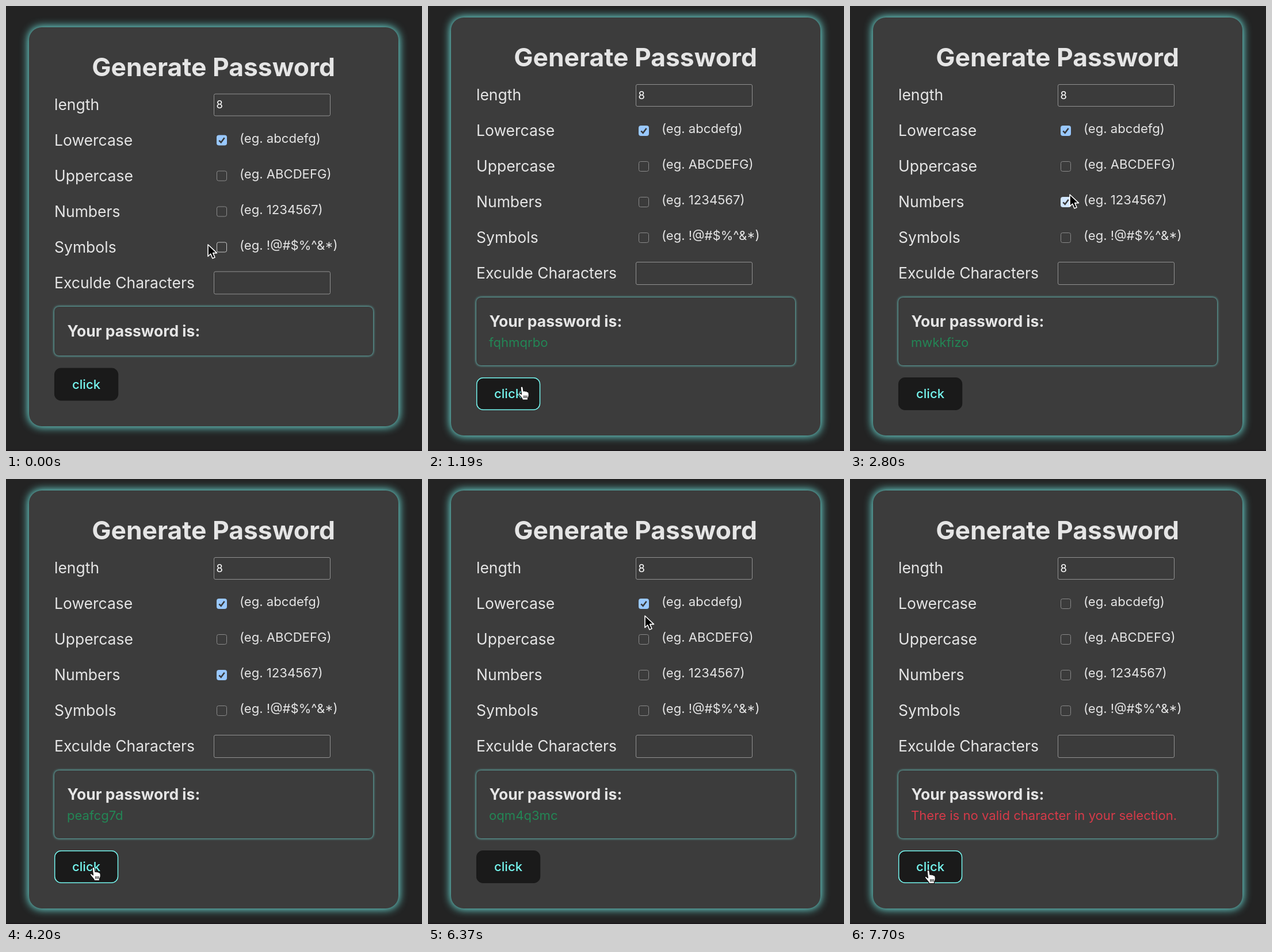
These frames come from a looping animation (723 px wide and 774 px high, 8 s). An HTML page:

```html
<!DOCTYPE html>
<html lang="en">
<head>
<meta charset="utf-8">
<title>Generate Password</title>
<style>
  html, body { margin: 0; width: 100%; height: 100%; overflow: hidden; background: #232323; }
  #stage { position: relative; width: 723px; height: 774px; overflow: hidden; }
  #stage::after { content: ""; position: absolute; left: 0; top: 772px; width: 723px; height: 2px; background: #1b181b; }
  #card, #box, svg { position: absolute; }
  #card { left: 40px; width: 642px; border-radius: 22px; background: #3c3c3c; box-shadow: 0 0 15px 1px #76f5ee; }
  #box { left: 84px; width: 554px; border-radius: 8px; background: #3c3c3c; box-shadow: 0 0 4px #76f5ee; }
  svg { left: 0; top: 0; z-index: 1; }
  text { font: 22.1px Inter, sans-serif; font-optical-sizing: none; fill: #e5e5e5; white-space: pre; }
  .title { font-size: 44.4px; font-weight: 700; text-anchor: middle; }
  .label { font-size: 26.5px; }
  .head { font-size: 26.5px; font-weight: 700; }
  .value { font-size: 18.4px; fill: #fff; }
  .click { font-weight: 500; fill: #76f7f0; text-anchor: middle; }
  .field { fill: #3b3b3b; stroke: #929292; }
  .tick { fill: none; stroke: #383838; stroke-width: 2.6; }
</style>
</head>
<body>
<div id="stage">
  <div id="card"></div>
  <div id="box"></div>
  <svg width="723" height="774">
    <g id="form">
      <text class="title" x="360.6" y="105">Generate Password</text>
      <rect class="field" x="361.5" y="136.5" width="202" height="38" rx="2.5"/>
      <text class="value" x="365.5" y="161.8">8</text>
      <rect class="field" x="361.5" y="445.5" width="202" height="39" rx="2.5"/>
      <text class="head" x="106.5" y="558">Your password is:</text>
    </g>
    <text id="result" x="106" y="593"></text>
    <g id="button">
      <rect id="face" x="84.7" y="646.7" width="109.8" height="55.6" rx="11" fill="#1a1a1a" stroke-width="1.5"/>
      <text class="click" x="139.5" y="682">click</text>
    </g>
    <g id="cursor" stroke-linejoin="round">
      <path id="arrow" d="M0 0V20.5L4.7 16 8 24 12 22.3 8.7 14.6H15.5Z" fill="#000" stroke="#fff" stroke-width="1.6"/>
      <g id="hand" stroke="#111" stroke-width="1.2">
        <path fill="#fff" d="M-2 1.5Q-1.5-.5 .5 0 2 .4 2 2L3 8Q5 6.5 6.3 8.3 8.2 7.3 9.2 9.2 11.5 8.8 12 11L12.3 15Q12 18 10.5 20V23H1.5Q1 20.5-2 17.5-5.5 13.5-6 12-5.5 10-3 11.5L-.5 13.5Z"/>
        <path d="M3.8 15.5v4.5M6.3 15.5v4.5M8.8 15.5v4.5"/>
      </g>
    </g>
  </svg>
</div>
<script>
const LOOP = 8000, STEP = 70, SHIFT = 16.5;
const $ = id => document.getElementById(id);
const form = $('form');

function add(tag, attrs, text = '') {
  const el = document.createElementNS('http://www.w3.org/2000/svg', tag);
  for (const k in attrs) el.setAttribute(k, attrs[k]);
  el.textContent = text;
  return form.appendChild(el);
}

const labels = ['length', 'Lowercase', 'Uppercase', 'Numbers', 'Symbols', 'Exculde Characters'];
labels.forEach((s, i) => add('text', { class: 'label', x: 84, y: 164.3 + 62 * i }, s));

const examples = ['abcdefg', 'ABCDEFG', '1234567', '!@#$%^&*'];
const options = examples.map((s, i) => {
  const cy = 217 + 62 * i;
  add('text', { x: 406, y: cy + 4 }, `(eg. ${s})`);
  return {
    cy,
    box: add('rect', { x: 366.5, y: cy - 8.5, width: 17, height: 17, rx: 3 }),
    tick: add('path', { class: 'tick', d: `M370.3 ${cy + .3}l3.4 3.5 6-8` })
  };
});

// Cursor stops: time, x, y
const path = [
  [0, 351, 415], [770, 170, 655], [1050, 163, 662], [1680, 163, 662],
  [2520, 379, 335], [2660, 379, 335], [2800, 382, 328], [2870, 382, 328],
  [3780, 152, 675.5], [4480, 152, 675.5], [5390, 385, 358], [5600, 379, 344],
  [5810, 379, 344], [6370, 377, 238], [6510, 376, 220], [6720, 376, 220],
  [7490, 136, 680.5], [8000, 136, 680.5]
];

const results = [
  [0, ''], [980, 'fqhmqrbo'], [1330, 'mwkkfizo'], [4200, 'peafcg7d'], [4340, 'oqm4q3mc'],
  [7630, 'There is no valid character in your selection.']
];

function cursorAt(t) {
  const i = path.findIndex(p => p[0] > t);
  const [t0, x0, y0] = path[i - 1], [t1, x1, y1] = path[i];
  const u = (t - t0) / (t1 - t0), e = u * u * (3 - 2 * u);
  return [x0 + (x1 - x0) * e, y0 + (y1 - y0) * e];
}

function place(el, top, bottom) {
  el.style.top = top + 'px';
  el.style.height = bottom - top + 'px';
}

function draw(t) {
  const [x, y] = cursorAt(t);
  const text = results.filter(r => r[0] <= t).pop()[1];
  const off = text ? 0 : SHIFT;

  place($('card'), off ? 37 : 20, off ? 731 : 747);
  place($('box'), off ? 523 : 507, off ? 608 : 625);
  form.setAttribute('transform', `translate(0 ${off})`);
  $('button').setAttribute('transform', `translate(0 ${-off})`);
  $('result').textContent = text;
  $('result').style.fill = text.includes(' ') ? '#d63a49' : '#238655';

  const checked = [t < 6580, false, t >= 2660 && t < 5670, false];
  options.forEach(({ cy, box, tick }, i) => {
    const hover = x > 345 && x < 387 && Math.abs(y - off - cy) <= 15;
    const fill = checked[i] ? (hover ? '#d1e6ff' : '#99c8ff') : '#3b3b3b';
    box.setAttribute('fill', fill);
    box.setAttribute('stroke', checked[i] ? fill : hover ? '#c4c4c4' : '#8a8a8a');
    tick.style.display = checked[i] ? '' : 'none';
  });

  const over = x > 84 && x < 195 && y > 646 - off && y < 703 - off;
  $('face').setAttribute('stroke', over ? '#76f7f0' : '#1a1a1a');
  $('hand').style.display = over ? '' : 'none';
  $('arrow').style.display = over ? 'none' : '';
  $('cursor').setAttribute('transform', `translate(${x} ${y})`);
}

const start = performance.now();
function tick(now) {
  const t = Math.max(0, now - start) % LOOP;
  draw(Math.floor(t / STEP) * STEP);
  requestAnimationFrame(tick);
}
tick(start);
</script>
</body>
</html>
```
